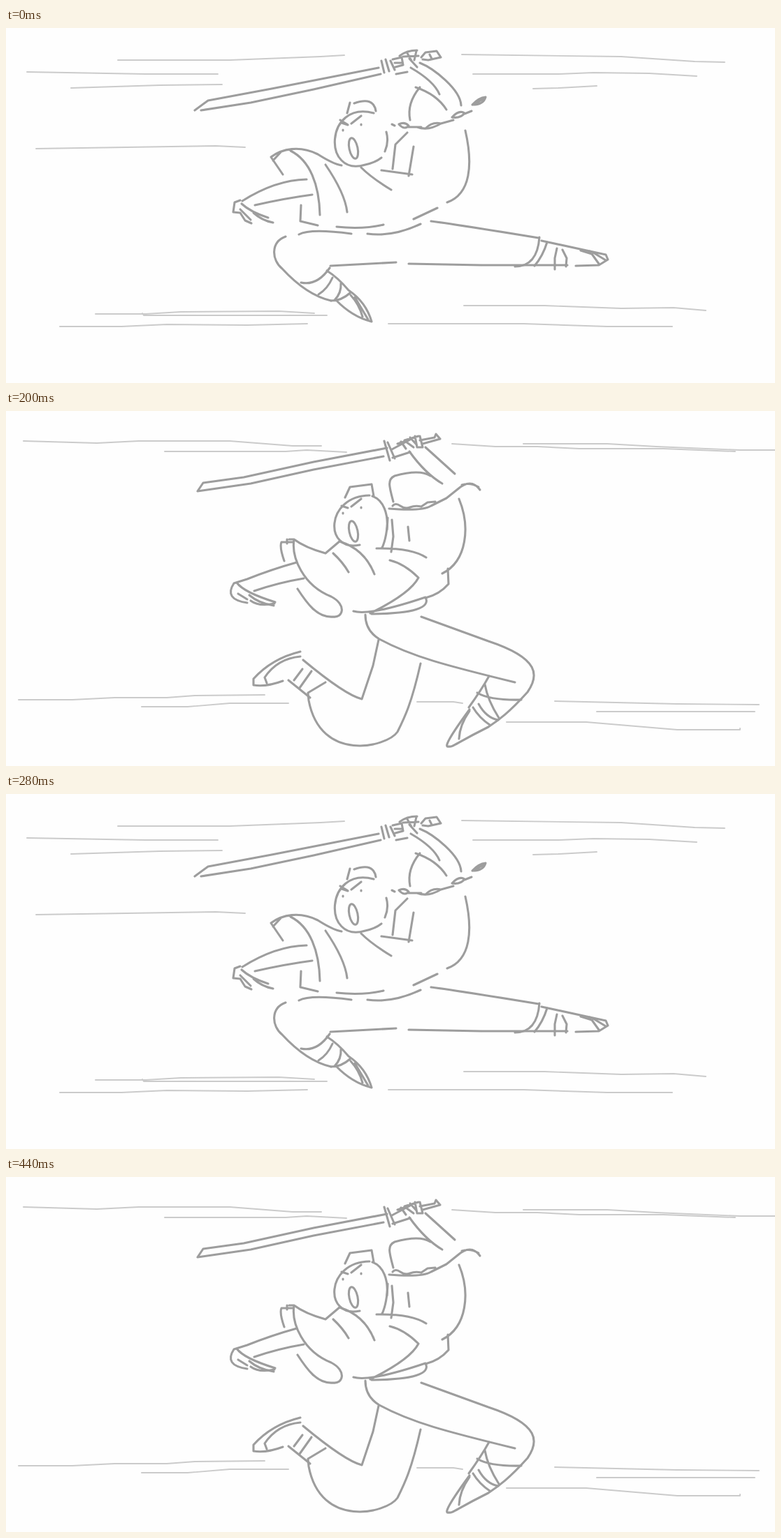
Write an HTML page that moves like this. It is 1100 px wide and 509 px high and loops after 480 ms.

```html
<!DOCTYPE html>
<html lang="en">
<head>
<meta charset="utf-8">
<title>Running swordsman</title>
<style>
  html, body { margin: 0; width: 100%; height: 100%; overflow: hidden; background: #fefefe; }
  svg { display: block; width: 1100px; height: 509px; }
  path, ellipse { fill: none; stroke: #9d9d9d; stroke-width: 3.1; stroke-linecap: round; stroke-linejoin: round; }
  .wind { stroke: #cbcbcb; stroke-width: 1.9; }
  .pose { opacity: 0; animation: 480ms step-end infinite; }
  #leap { animation-name: leap; }
  #tuck { animation-name: tuck; }
  #land { animation-name: land; }
  @keyframes leap { 0% { opacity: 1 } 25% { opacity: 0 } 58.3333% { opacity: 1 } 75%, 100% { opacity: 0 } }
  @keyframes tuck { 0% { opacity: 0 } 25% { opacity: 1 } 41.6667% { opacity: 0 } 75% { opacity: 1 } 91.6667%, 100% { opacity: 0 } }
  @keyframes land { 0% { opacity: 0 } 41.6667% { opacity: 1 } 58.3333% { opacity: 0 } 91.6667%, 100% { opacity: 1 } }
</style>
</head>
<body>
<svg viewBox="0 0 1100 509">
  <g id="face">
    <path d="M480 136L489 139M494 137L508 126M482 146v1M508 138v1"/>
    <ellipse cx="497" cy="172.500" rx="6" ry="15" transform="rotate(-12 497 172.500)"/>
  </g>

  <g class="pose" id="leap">
    <path class="wind" d="M160 46H320L450 41 484 39M30 63L200 66H303M93 86L220 82 309 81M43 173L300 169 342 171"/>
    <path class="wind" d="M128 410H200L250 407 390 406 441 409M195 409L197 412H459M77 428H165L230 425 345 426 431 424"/>
    <path class="wind" d="M547 424H740L860 428H953M655 398H770L880 402 955 401 1001 405"/>
    <path class="wind" d="M652 38L880 41 985 48 1028 49M668 66H790L840 64 920 65 988 69M754 87L790 86 845 83"/>
    <path class="sword" d="M279 118L350 107 440 88 536 66M270 118L289 104 380 87 533 57"/>
    <path class="hilt" d="M537 47L541 64M543 45L548 62M550 47L556 60M553 45L566 42 568 53 557 56M556 50H566M594 42L600 35 616 33 622 42 604 46 596 45M606 38L609 44"/>
    <path class="grip" d="M563 40Q573 32 588 32M574 36L580 47M568 41L590 40M577 44L588 56M587 33L584 46M558 66L574 63"/>
    <path class="arm" d="M592 50C612 58 650 88 651 111M579 57Q612 76 620 95M586 85Q616 95 630 117M592 85Q573 108 578 132"/>
    <path class="arm" d="M430 217Q385 218 338 248M438 239Q400 244 356 254M335 247L327 250 325 264 335 265 342 276 351 280M337 252Q350 264 375 272M335 260L350 275M354 265Q366 276 382 279"/>
    <path class="rope" d="M552 138L556 140M562 138Q570 134 576 140Q570 147 562 138M574 142H594M588 142Q604 148 622 137Q610 134 600 144M622 137L640 132M638 128Q648 117 656 122Q650 130 638 128M656 123L666 119M667 110Q676 100 686 99Q683 110 667 110M672 108L682 102"/>
    <path class="head" d="M526 122C456 103 452 215 514 196Q528 193 537 186M544 149Q548 163 542 177M488 122L492 107M498 108Q526 98 529 119M478 132L488 138"/>
    <path class="torso" d="M657 147C668 195 665 238 631 250M574 150L557 167 553 202M537 204L581 210M583 170L576 212M508 200Q523 215 551 232"/>
    <path class="sleeve" d="M480 197Q468 195 446 181C420 168 395 173 379 185L396 210M382 190L393 178M407 176C435 190 448 225 449 268M457 196Q485 237 488 264"/>
    <path class="belt" d="M422 254L421 277 446 283M473 285Q510 289 540 282M419 296Q435 287 494 295M517 295Q553 300 593 281M583 274L617 258"/>
    <path class="legs" d="M400 299C378 307 380 333 395 345Q430 383 465 391M422 365Q445 370 463 344M464 341L558 336M576 338L680 340H803M608 277Q640 281 762 301M766 305L835 320"/>
    <path class="foot" d="M763 300Q760 342 728 342M774 307Q768 327 756 341M788 316L785 330V346M796 318L802 330 801 342M835 320L858 325 861 332 848 340 815 341M822 319L838 324 848 338M840 322L858 333"/>
    <path class="foot" d="M459 348Q475 358 490 376Q515 393 523 421Q495 414 472 390M447 382Q460 374 467 358M470 390Q480 380 479 366M465 391Q480 391 492 380M493 383Q505 396 510 414M499 386L518 418"/>
  </g>

  <g class="pose" id="tuck">
    <path class="wind" d="M88 51H290L400 45 517 42M230 63L350 58 457 54M385 66H425L468 59M31 434L130 431 223 428M44 420H190L245 417 292 419M161 412L170 414H285"/>
    <path class="wind" d="M718 409L880 413 1000 415 1064 419M906 403L1010 408H1071M1050 407L974 415 1030 417M674 54L697 52M777 41L900 43 1010 44M716 164H729M820 164H880L1082 168"/>
    <path class="sword" d="M536 57L430 77 350 92 283 104 275 117 300 114 400 95 480 79 536 67"/>
    <path class="hilt" d="M541 48L546 67 553 70M546 47L552 68M546 49L575 41M552 66L580 59M593 42L615 34 622 43 603 50"/>
    <path class="grip" d="M572 41L577 54M569 42L580 39 585 48M586 38L592 48 597 52 604 50M574 56L580 63 592 60M577 55L588 52"/>
    <path class="arm" d="M602 50L636 77Q651 92 646 107M585 61Q608 92 643 109M599 82Q600 105 580 122"/>
    <path class="arm" d="M437 215Q385 220 333 246L324 252V264L346 280 350 276 338 263M438 240Q400 243 348 258M328 249Q345 262 378 271L386 275Q380 280 360 278M345 263L372 277"/>
    <path class="rope" d="M550 144Q543 132 568 129Q564 140 550 144M566 129Q575 122 583 124Q578 133 568 130M580 124Q590 110 600 118Q590 124 580 122M598 117Q615 108 632 115M598 114Q618 107 645 118T670 128Q682 128 687 115M630 117L655 122"/>
    <path class="head" d="M520 121C455 109 452 201 515 199Q545 197 544 150M534 128Q542 134 545 145M486 123L492 107 522 105 530 122M486 123L495 121"/>
    <path class="torso" d="M668 132C690 150 692 170 683 199M553 152V200M557 155Q562 159 568 155M478 191Q500 201 560 201Q580 206 596 214M512 201Q535 220 548 236M478 195C497 215 503 230 503 251"/>
    <path class="sleeve" d="M428 149C455 158 465 175 473 201M409 217Q394 185 398 165C402 142 425 145 431 155C441 175 434 220 452 279M428 244Q437 262 447 272M443 277Q470 285 500 284"/>
    <path class="belt" d="M683 212Q645 232 604 243M612 221L613 249 600 256M597 275L599 288M598 236Q570 258 515 289Q555 303 600 286M527 287L560 278 598 265M527 288L560 284 596 271"/>
    <path class="legs" d="M600 285C625 262 660 228 686 221C728 212 724 255 710 275C688 315 650 328 600 348C575 360 547 372 547 352Q553 341 585 316M676 248Q650 262 600 303L575 322"/>
    <path class="legs" d="M497 292C440 318 405 353 370 382C320 422 310 434 313 453C325 468 390 448 445 418M570 318Q510 335 450 375L412 400"/>
    <path class="foot" d="M416 397Q413 432 385 450M420 400L418 437M427 396L433 428M415 397L476 372Q473 417 450 451H443Q444 410 460 378M444 435L455 438M430 393L437 402 444 391M432 415L440 405"/>
    <path class="foot" d="M598 307Q582 327 606 349M612 290L600 310M602 307Q615 328 637 331M623 285Q620 310 628 334M632 282Q640 300 653 312M573 318L592 317M585 316Q547 348 562 360"/>
  </g>

  <g class="pose" id="land">
    <path class="wind" d="M25 43L130 46 190 43H320L410 50H451M227 58H400L430 56 487 59M18 414H95L155 411H230L270 408 370 407M194 424H260L320 419H404M588 417H640L653 419"/>
    <path class="wind" d="M638 47L700 51H760L820 54H940L1043 58M740 47H860L930 51 1050 56H1100M785 416L960 420 1077 421M845 431H1071M716 446H830L960 457H1050V455"/>
    <path class="sword" d="M545 53L440 73 340 95 282 103 274 115 350 104 440 84 540 65"/>
    <path class="hilt" d="M541 43L549 71M546 45L556 68M552 55L580 40M560 47L575 42M553 67L578 59M565 44L572 54M592 42L613 38 615 33 621 40 596 47"/>
    <path class="grip" d="M572 44L583 52M578 38L587 48M585 36L588 52H596L592 36M570 42L590 36"/>
    <path class="arm" d="M600 52L642 90M577 58Q600 90 624 104M607 93Q592 83 556 93C545 98 548 108 554 130"/>
    <path class="arm" d="M416 217Q380 227 345 241L326 247Q311 270 345 275M426 240Q390 246 355 258M332 262L345 270M330 246Q340 260 385 274M348 264Q362 276 383 279M350 272Q362 281 384 276"/>
    <path class="rope" d="M548 140Q595 144 608 136L630 125 645 113Q665 95 678 113M553 136Q557 131 564 136T578 138 594 137L603 131 614 130M652 106Q664 102 676 109"/>
    <path class="head" d="M506 192C455 203 456 122 520 121M524 122C540 128 547 147 545 170M485 124L492 109 523 105 526 122"/>
    <path class="torso" d="M648 126C664 165 660 215 624 233M632 226L633 248Q620 263 600 268M552 156L554 180 551 202M575 166L577 186M546 153Q545 181 538 196M530 197Q580 196 601 210M477 187Q513 198 527 234M468 204Q482 217 490 231"/>
    <path class="belt" d="M549 214Q570 219 590 239Q578 262 521 290M497 287Q520 294 600 267Q612 290 523 291"/>
    <path class="sleeve" d="M477 187L457 204Q428 196 412 184H405M412 184C408 210 425 250 465 266C488 278 482 297 468 295C445 297 430 275 417 255M410 188H394Q391 195 398 215M402 184V190"/>
    <path class="legs" d="M594 295L690 330C765 355 762 380 746 403C720 432 705 443 690 453C640 478 640 482 633 481Q622 484 663 428M514 292Q514 315 534 327C580 352 630 365 728 389"/>
    <path class="legs" d="M533 328L525 365 509 413Q485 407 425 357M593 362C580 420 570 440 560 460C545 482 450 505 433 415L432 405"/>
    <path class="foot" d="M421 345Q380 355 354 384V393Q372 396 396 387M421 352Q388 355 370 382L373 390M424 370L412 386M437 373L420 397M457 389L432 404M404 386L435 411"/>
    <path class="foot" d="M691 380Q680 400 662 425M674 404Q692 415 737 414M685 392Q689 415 705 440M668 425Q677 440 692 450M663 430Q649 450 648 470M676 420Q687 440 704 443"/>
  </g>
</svg>
</body>
</html>
```
